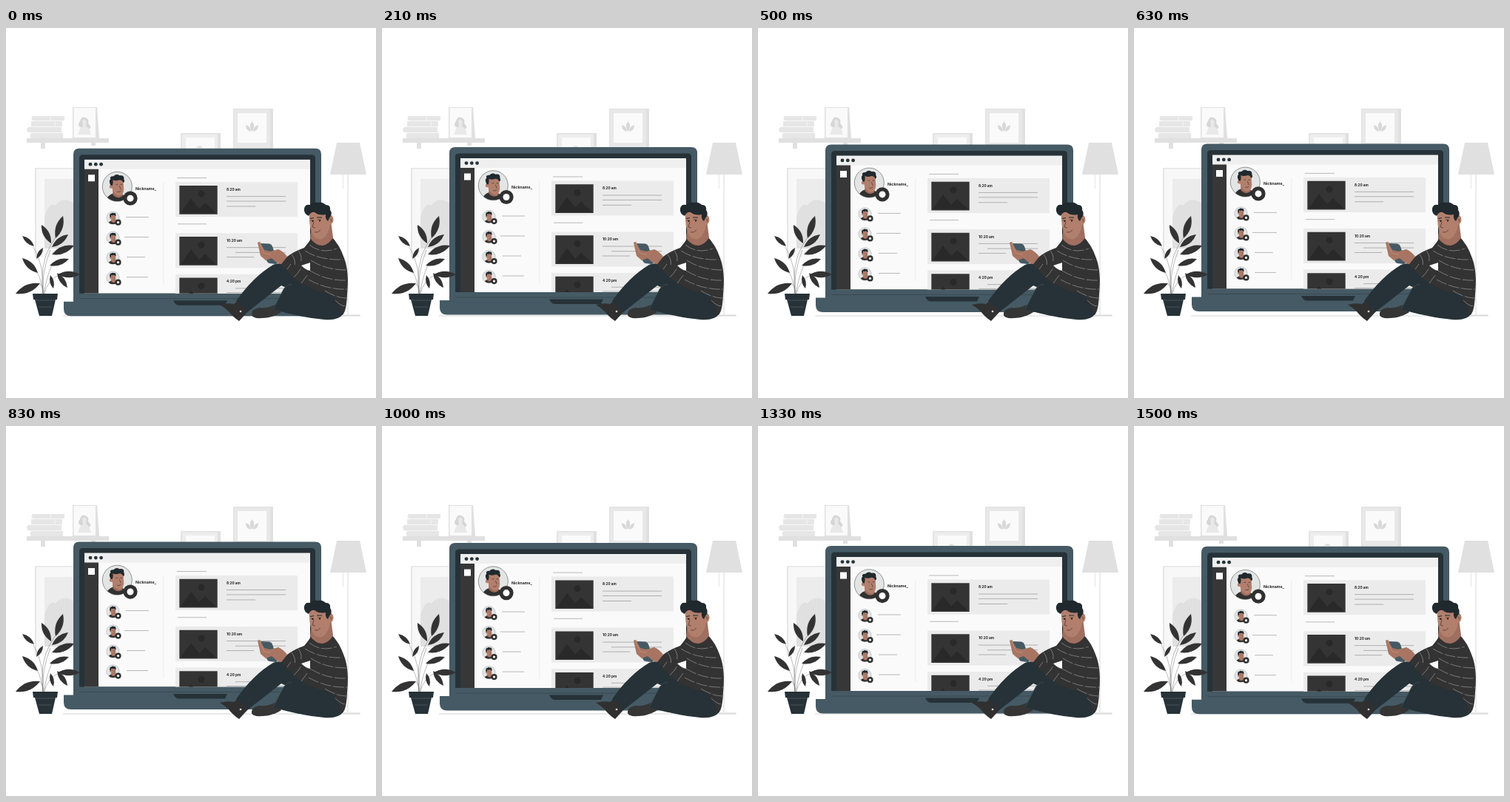
These frames come from a looping animation (500x500 px, 1540 ms). An HTML page:

```html
<!DOCTYPE html>
<html lang="en">
<head>
<meta charset="utf-8">
<title>Floating laptop</title>
<style>
  html, body { margin: 0; width: 100%; height: 100%; overflow: hidden; background: #fff; }
  svg { display: block; width: 100%; height: 100%; }
  text { font-family: Inter, sans-serif; font-weight: 700; fill: #222; }
</style>
</head>
<body>
<svg viewBox="0 0 500 500">
  <defs>
    <clipPath id="disc"><circle r="20"/></clipPath>
    <clipPath id="screen"><path d="M106 177H411V358H106Z"/></clipPath>
    <g id="avatar">
      <circle r="20" fill="#e3e5e5"/>
      <g clip-path="url(#disc)">
        <path d="M-15 20Q-14 12-5 9L7 11Q14 13 15 20Z" fill="#303030"/>
        <path d="M-6 4V11Q0 18 7 13V5Z" fill="#9c6a5b"/>
        <path d="M-7-9Q0-12 8-9L9 4Q8 13 2 13Q-5 11-7 2Z" fill="#b27f6d"/>
        <circle cx="-8" cy="0" r="2.500" fill="#b27f6d"/>
        <path d="M-9-2Q-12-8-9-10Q-11-14-5-14Q-1-18 3-15Q10-16 9-10Q11-7 8-5Q7-9 3-9Q-2-7-6-9Q-5-4-7-1Z" fill="#20292d"/>
        <path d="M-2-3H1M4-3H7M0 7Q3 8 5 6M3-1L5 4" fill="none" stroke="#453029" stroke-width=".7"/>
      </g>
      <circle r="20" fill="none" stroke="#555" stroke-width=".6"/>
    </g>
    <g id="thumb">
      <path d="M0 0H165V47H0Z" fill="#ebebeb"/>
      <path d="M5.300 4.800H56.700V43.500H5.300Z" fill="#343434"/>
      <circle cx="35" cy="16" r="4.500" fill="#292929"/>
      <path d="M7 42L21 22L32 36L40 28L55 42Z" fill="#292929"/>
    </g>
  </defs>

  <g id="room" fill="#e0e0e0">
    <path d="M28 149H139V155H28ZM47 155H53V163H47ZM115 155H121V159H115Z"/>
    <path d="M36 119H78Q81 122 78 125H36Q33 122 36 119ZM34 126H76V133H34ZM30 134H75V141H30Q26 137 30 134ZM34 142H77V149H34Q31 145 34 142Z" fill="#e6e6e6"/>
    <path d="M38 125.500H79M31 133.500H75M30 141.500H76M60 120V125M66 127V133" stroke="#f7f7f7"/>
    <path d="M90 107H123L126 149H90Z"/>
    <path d="M91.500 108H121V148H91.500Z" fill="#fafafa"/>
    <path d="M100 134Q96 130 100 126Q102 119 107 121Q113 123 111 129Q117 134 112 137Z" fill="#d6d6d6"/>
    <path d="M103 125Q107 121 109 127L108 132L112 136L115 144H97L100 136L104 133Z" fill="#e8e8e8"/>
    <path d="M236 142H290V175H236Z"/>
    <path d="M237.500 143.500H286V175H237.500Z" fill="#ededed"/>
    <path d="M243 148H282V175H243Z" fill="#fafafa"/>
    <path d="M257 162Q261 156 266 162Z"/>
    <path d="M307 109H361V175H307Z"/>
    <path d="M308 110H357V175H308Z" fill="#e8e8e8"/>
    <path d="M313 115H352V155H313Z" fill="#fafafa"/>
    <path d="M332.500 126Q338 133 332.500 140Q327 133 332.500 126ZM324 131Q330 132 331 140Q324 139 324 131ZM341 131Q335 132 334 140Q341 139 341 131Z" fill="#d8d8d8"/>
    <path d="M39 189H98V310H39Z" fill="#e6e6e6"/>
    <path d="M41 190.500H98V310H41Z" fill="#f8f8f8"/>
    <path d="M52 204H92V298H52Z" fill="#ececec"/>
    <path d="M52 256Q58 234 67 240Q76 226 92 237V298H52Z"/>
    <path d="M447 155H478L487 198H438Z"/>
    <path d="M461 198H463V387H478V389H448V387H461Z" fill="#ebebeb"/>
    <path d="M455.500 198V217" stroke="#e0e0e0" stroke-width=".8"/>
  </g>
  <path d="M77 389H479" stroke="#b5b5b5" stroke-width=".6"/>

  <g id="laptop">
    <path d="M91 370V170Q91 162 99 162H418Q426 162 426 170V370Z" fill="#455a64"/>
    <path d="M99 358V175Q99 170.500 104 170.500H413Q418 170.500 418 175V358Z" fill="#263238"/>
    <g clip-path="url(#screen)">
      <path d="M106 177H411V358H106Z" fill="#fafafa"/>
      <path d="M106 177H411V190H106Z" fill="#efefef"/>
      <path d="M106 190H125V358H106Z" fill="#373737"/>
      <g fill="#263238"><circle cx="114" cy="183.500" r="2.400"/><circle cx="121.300" cy="183.500" r="2.400"/><circle cx="128.600" cy="183.500" r="2.400"/></g>
      <path d="M111 197.500H120V206.500H111Z" fill="#fff"/>
      <path d="M213 208V346" stroke="#e6e6e6" stroke-width=".7"/>
      <use href="#avatar" x="150.300" y="213.700"/>
      <circle cx="168" cy="229.500" r="9.600" fill="#303030"/>
      <circle cx="168" cy="229.500" r="4.500" fill="#fff"/>
      <text x="175" y="218" font-size="5.200">Nickname_</text>
      <g id="friends"></g>
      <use href="#thumb" x="229" y="207.500"/>
      <use href="#thumb" x="229" y="276.500"/>
      <use href="#thumb" x="229" y="332"/>
      <g font-size="4.700">
        <text x="298" y="219.300">8:20 am</text>
        <text x="298" y="288.200">10:20 am</text>
        <text x="298" y="343.800">4:20 pm</text>
      </g>
      <path d="M231 202H271M232 264.200H271M298 227H378M298 233.400H378M298 240.400H337M298 296H378M310 302.700H378M298 309H335M310 351.200H378M298 357H378" stroke="#555" stroke-width=".4"/>
    </g>
    <path d="M78 369H440V380Q440 388.500 430 388.500H88Q78 388.500 78 379Z" fill="#455a64"/>
    <path d="M100 365H417" stroke="#37474f" stroke-width=".8"/>
    <path d="M226 367.500H299L296 374H233Q229 374 226 367.500Z" fill="#263238"/>
  </g>

  <g id="plant" fill="#333">
    <path d="M50 360Q45 320 60 294L70 278M50 360Q52 320 37 296M50 358Q48 330 60 300M51 360Q55 335 62 321M51 360Q58 338 72 334M50 360Q48 340 42 330M50 360Q51 349 45 345" fill="none" stroke="#777" stroke-width=".5"/>
    <g id="leaves"></g>
    <path d="M36 359H70L69 367H37ZM39 367H67L62 389H45Z" fill="#263238"/>
    <path d="M39 368H67M44 377H62" stroke="#60717a" stroke-width=".5"/>
  </g>

  <g id="man">
    <path d="M332 388Q331 380 342 378Q354 379 363 374L372 384Q360 392 346 392Q334 393 332 388Z" fill="#353535"/>
    <path d="M311 369Q334 336 361 320Q369 316 380 321L420 345L410 365L372 348Q349 366 326 384Z" fill="#263238"/>
    <path d="M361 380L375 353Q379 346 390 346L437 355Q456 369 456 386Q449 396 430 394Q396 391 361 380Z" fill="#263238"/>
    <path d="M361 380L375 353Q379 347 387 346" fill="none" stroke="#40525b" stroke-width=".7"/>
    <path d="M289 374Q299 371 308 373L313 369L327 383L315 396Q306 390 301 383Q296 378 289 374Z" fill="#303030"/>
    <circle cx="317" cy="383" r="1.300" fill="#eee"/>
    <path d="M414 282Q409 290 403 297Q389 302 380 309L371 318Q382 332 399 345Q409 352 424 356L440 361Q450 373 454 388Q460 385 461 360Q464 329 457 311Q451 293 439 281Z" fill="#333"/>
    <path d="M411 317L399 321Q405 327 411 328Z" fill="#fafafa"/>
    <g fill="none" stroke="#a8a8a8" stroke-width=".6" stroke-dasharray="15 2.500">
      <path d="M410 293Q426 306 447 298M404 301Q424 314 455 313M412 314Q432 327 460 327M411 328Q434 342 461 341M409 340Q434 354 461 353M431 355Q447 365 460 365M445 368Q453 376 459 376"/>
      <path d="M395 301Q401 309 398 317M386 306Q392 314 390 322M389 337Q396 330 399 324M380 326L385 319M399 345L407 334"/>
    </g>
    <path d="M344 291L356 291.500Q359 292 360 295L367 316Q367 319 364 319L356 318Q353 317 352 314Z" fill="#455a64"/>
    <path d="M340 290Q344 287 345 293L349 300L357 302L368 299Q375 302 380 309L372 319L366 317L359 311L351 314L344 308Z" fill="#a87563"/>
    <path d="M341 290Q344 289 344 294L349 305L358 306" fill="none" stroke="#c08b78"/>
    <path d="M413 268L411 284Q418 294 428 294Q437 292 442 283L439 260Z" fill="#a06f60"/>
    <path d="M410 250Q424 244 438 252Q444 255 442 262Q440 266 438 265Q436 280 427 285Q417 287 413 276Q409 263 410 250Z" fill="#b27f6d"/>
    <path d="M409 254Q402 251 403 244Q404 238 411 239Q416 234 421 236Q427 234 432 239Q439 239 438 246Q442 251 437 257L435 261Q431 258 432 252Q423 254 417 249Q412 248 409 254Z" fill="#20292d"/>
    <path d="M412 260H416M421 259H426M416 262L414 269L418 270M417 276Q422 277 425 273M438 258Q441 258 439 262" fill="none" stroke="#4b3029" stroke-width=".7"/>
    <path d="M411 257.500L416 256.500M420 256L427 256" stroke="#20292d"/>
    <circle cx="414.500" cy="261" r=".9"/><circle cx="424" cy="260.500" r=".9"/>
  </g>
</svg>
<script>
const byId = id => document.getElementById(id);

// Leaf from base to tip, bulging to either side.
function leaf([x1, y1, x2, y2], bulge = 0.29) {
  const mx = (x1 + x2) / 2, my = (y1 + y2) / 2;
  const dx = (y2 - y1) * bulge, dy = (x1 - x2) * bulge;
  return `<path d="M${x1} ${y1}Q${mx + dx} ${my + dy} ${x2} ${y2}Q${mx - dx} ${my - dy} ${x1} ${y1}Z"/>`;
}
byId('leaves').innerHTML = [
  [67, 284, 77, 254], [61, 291, 48, 266], [38, 295, 22, 281], [41, 312, 50, 297],
  [62, 296, 84, 279], [62, 306, 92, 294], [59, 321, 85, 312], [70, 333, 100, 333],
  [43, 331, 22, 311], [46, 345, 13, 359], [69, 331, 83, 351], [60, 334, 64, 352]
].map(p => leaf(p)).join('');

const friendLines = [[162, 193], [160, 193], [163, 188], [163, 192]];
byId('friends').innerHTML = friendLines.map(([from, to], i) => {
  const y = 256 + 27 * i;
  return `<use href="#avatar" transform="translate(144.500 ${y}) scale(.43)"/>
    <circle cx="151.500" cy="${y + 6}" r="4.100" fill="#303030"/>
    <circle cx="151.500" cy="${y + 6}" r="1.600" fill="#fff"/>
    <path d="M${from} ${y - 1}H${to}" stroke="#555" stroke-width=".4"/>`;
}).join('');

const LOOP = 1540, PEAK = 720, LIFT = 6.5, REST = 0.7;
const laptop = byId('laptop');
function draw() {
  const phase = 2 * Math.PI * (performance.now() - PEAK) / LOOP;
  laptop.setAttribute('transform', `translate(0 ${REST - LIFT / 2 * (1 + Math.cos(phase))})`);
  requestAnimationFrame(draw);
}
draw();
</script>
</body>
</html>
```
